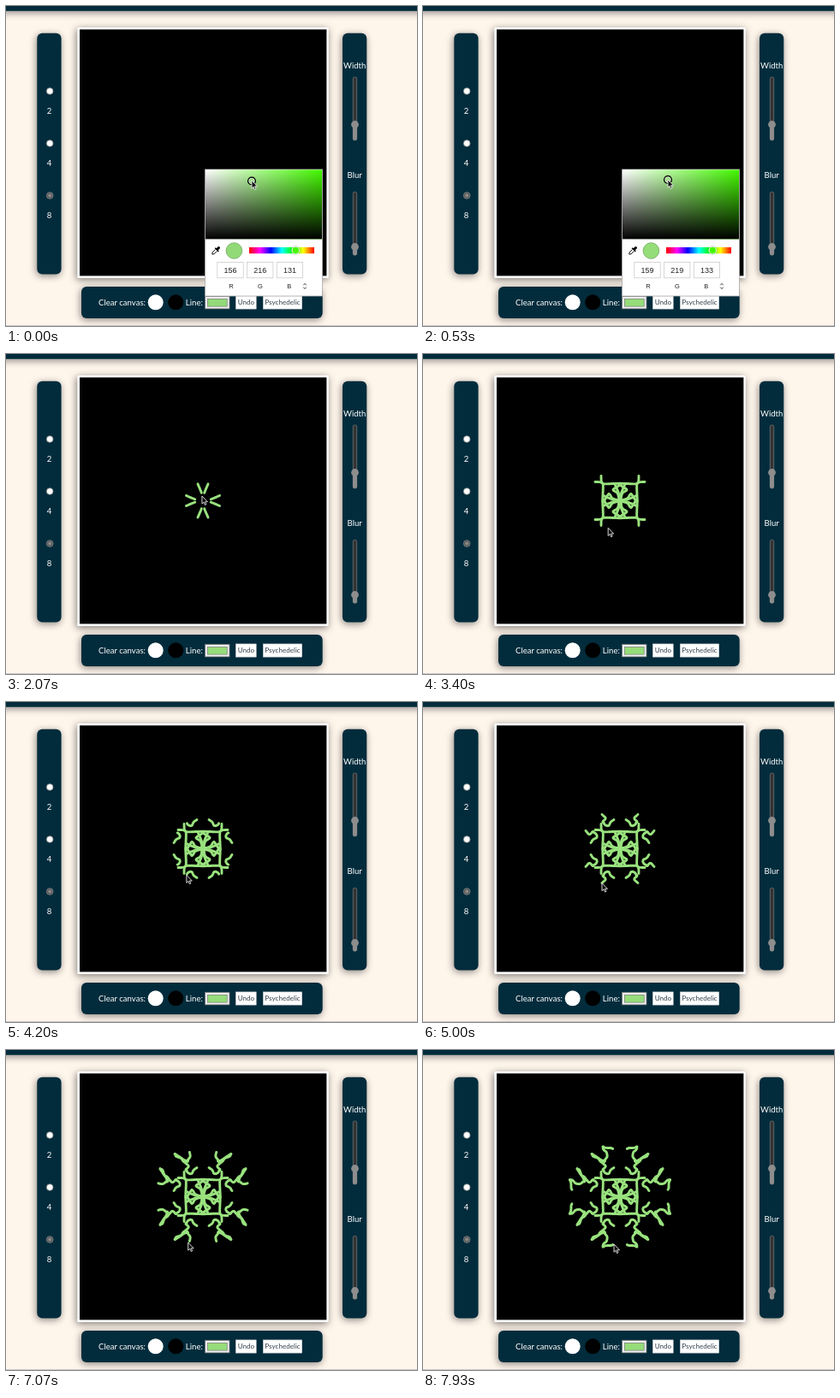
Recreate the animation shown at these times as an HTML page. Size 480 px wide and 374 px high, loop 8 s.

```html
<!DOCTYPE html>
<html lang="en">
<head>
<meta charset="utf-8">
<title>Kaleidoscope drawing</title>
<style>
html, body { margin: 0; width: 100%; height: 100%; overflow: hidden; background: #fef5eb; }
svg { display: block; width: 100%; height: 100%; }
text { font-family: Lato, "Open Sans", sans-serif; font-size: 9.6px; fill: #fff; }
.mid { text-anchor: middle; }
.panel { fill: #022c3c; filter: drop-shadow(-1px 2px 4px rgba(0,0,0,.45)); }
.btn { fill: #fff; stroke: #c9cdd0; stroke-width: .6; }
.btnText { font-size: 8.1px; fill: #33404c; text-anchor: middle; }
.num, .lab { font-family: "Liberation Sans", Arial, sans-serif; text-anchor: middle; fill: #222; }
.num { font-size: 9px; }
.lab { font-size: 7.5px; }
#art { fill: none; stroke: #99e27e; stroke-width: 2.9; stroke-linecap: round; stroke-linejoin: round; }
</style>
</head>
<body>
<svg viewBox="0 0 480 374" preserveAspectRatio="none">
  <defs>
    <linearGradient id="sat"><stop stop-color="#fff"/><stop offset="1" stop-color="#43f800"/></linearGradient>
    <linearGradient id="dark" x2="0" y2="1"><stop stop-color="#000" stop-opacity="0"/><stop offset="1"/></linearGradient>
    <linearGradient id="hue"></linearGradient>
    <path id="line"/>
  </defs>

  <rect width="480" height="374" fill="#fef5eb"/>
  <rect class="panel" x="-9" y="-9" width="498" height="14.8"/>
  <rect y="373" width="480" height="1" fill="#cbcaca"/>

  <rect class="panel" x="36.3" y="31.8" width="28.3" height="281.6" rx="6"/>
  <rect class="panel" x="393" y="31.8" width="28.3" height="281.6" rx="6"/>
  <rect class="panel" x="88" y="328" width="281.7" height="37" rx="6"/>
  <rect x="83.3" y="25" width="293.4" height="293" rx="1.5" fill="#fff" style="filter:drop-shadow(-1px 2px 4px rgba(0,0,0,.5))"/>
  <rect x="86" y="27.4" width="288.4" height="288"/>

  <g id="radios"></g>
  <text class="mid" x="407.2" y="73">Width</text>
  <text class="mid" x="407.2" y="201">Blur</text>
  <g id="sliders"></g>

  <text x="108" y="349.5">Clear canvas:</text>
  <circle cx="174.7" cy="346.3" r="9" fill="#fff"/>
  <circle cx="198.3" cy="346.3" r="9"/>
  <text x="209.8" y="349.5">Line:</text>
  <rect x="232.5" y="339.3" width="28.5" height="14.6" fill="#f0f0f0" stroke="#777" stroke-width=".8"/>
  <rect class="tint" x="235.4" y="342.3" width="22.8" height="8.8" stroke="#777" stroke-width=".7"/>
  <rect class="btn" x="268.4" y="338.9" width="23.8" height="15.2"/>
  <text class="btnText" x="280.4" y="349">Undo</text>
  <rect class="btn" x="300.3" y="338.9" width="45.4" height="15.2"/>
  <text class="btnText" x="323" y="349">Psychedelic</text>

  <g id="art"></g>

  <g id="picker">
    <rect x="232.5" y="191" width="137" height="148" fill="#fff" stroke="#aaa" stroke-width=".8"/>
    <rect x="233" y="191.4" width="136" height="81" fill="url(#sat)"/>
    <rect x="233" y="191.4" width="136" height="81" fill="url(#dark)"/>
    <g id="spot" fill="none"><circle r="4.3" stroke="#000" stroke-width="1.5"/><circle r="3.3" stroke="#fff" stroke-width=".6"/></g>
    <g transform="translate(244.8 286.2) rotate(45)">
      <path d="M-1.5 -6q1.5 -1.5 3 0v3.2h1.4v1.6h-5.8v-1.6h1.4z"/>
      <path d="M-1.3 -1v5l1.3 1.6l1.3 -1.6v-5" fill="#fff" stroke="#000" stroke-width=".9"/>
    </g>
    <circle class="tint" cx="266.4" cy="286" r="9.3" stroke="#71a65f" stroke-width=".8"/>
    <rect x="284" y="282" width="76" height="7.3" fill="url(#hue)"/>
    <circle cx="338.3" cy="285.6" r="4.3" fill="#43f800" stroke="#fff"/>
    <circle cx="338.3" cy="285.6" r="4.9" fill="none" stroke="#999" stroke-width=".4"/>
    <g id="fields"></g>
    <path d="M347.3 326.3l1.7 -2l1.7 2M347.3 328.6l1.7 2l1.7 -2" fill="none" stroke="#333" stroke-width=".9"/>
  </g>

  <g id="cursor">
    <path id="arrow" d="M0 0V9.2L2.1 7.3L3.5 10.5L5 9.8L3.6 6.8H6.5Z" fill="#111" stroke="#fff" stroke-width=".8"/>
    <path id="hand" d="M1.2 .6Q2.1 -.4 2.8 .7V3.7Q4 3 4.6 4Q5.7 3.4 6.1 4.3Q7.3 4 7.4 5.2V7.3L6.4 9.8H2.2L-.8 6.2Q-.5 5.2 1.2 6.2Z" fill="#fff" stroke="#333" stroke-width=".5"/>
  </g>
</svg>
<script>
const LOOP = 8000, STEP = 200 / 3, CX = 230, CY = 171.5, LAG = 80;
const CLICK = 1530;
const $ = id => document.getElementById(id);

for (let i = 0; i <= 6; i++)
  $('hue').innerHTML += `<stop offset="${i / 6}" stop-color="hsl(${360 - 60 * i} 100% 50%)"/>`;

$('radios').innerHTML = [2, 4, 8].map((n, i) => {
  const y = 99.5 + 61 * i, on = n === 8;
  return `<circle cx="51.2" cy="${y}" r="3.8" fill="${on ? '#555' : '#fff'}" stroke="#8b8b8b" stroke-width=".8"/>` +
    (on ? `<circle cx="51.2" cy="${y}" r="2" fill="#8b8b8b"/>` : '') +
    `<text class="mid" x="50.6" y="${y + 26.5}">${n}</text>`;
}).join('');

const slider = (y, thumb) =>
  `<rect x="405.3" y="${y}" width="4.4" height="74" rx="2" fill="#333" stroke="#727272" stroke-width=".8"/>
   <rect x="405" y="${thumb}" width="5" height="${y + 74 - thumb}" rx="2" fill="#8d8d8d"/>
   <circle cx="407.5" cy="${thumb}" r="4.4" fill="#8d8d8d"/>`;
$('sliders').innerHTML = slider(83, 138.5) + slider(217.3, 281.5);

$('fields').innerHTML = ['R', 'G', 'B'].map((c, i) => {
  const x = 262 + 34.7 * i;
  return `<rect x="${x - 15.2}" y="299.4" width="30.4" height="18.4" fill="#fff" stroke="#ccc" stroke-width=".8"/>
    <text class="num" x="${x}" y="311.6"></text>
    <text class="lab" x="${x + 1 - i * .8}" y="330">${c}</text>`;
}).join('');

// Eight mirrored copies of one line
let copies = '';
for (const sx of [1, -1]) for (const sy of [1, -1])
  for (const m of [[sx, 0, 0, sy], [0, sy, sx, 0]])
    copies += `<use href="#line" transform="matrix(${m} ${CX} ${CY})"/>`;
$('art').innerHTML = copies;

// Pointer moves through evenly timed points, measured from the middle of the drawing
const move = (from, to, pen, ...pts) => ({ from, to, pen, pts });
const moves = [
  move(0, 530, 0, [57, 32.5], [56, 31.5]),
  move(670, 1470, 0, [56, 31.5], [30, 3], [.5, -21.5], [-6, -19.5]),
  move(CLICK, 1800, 1, [-6, -19.5], [-6, -19.5]),
  move(1800, 3260, 1, [-6, -19.5], [-1.5, -8.5], [-1, 2], [-3, 9], [-8, 13], [1, 20], [-20, 20], [-22, 29]),
  move(3260, 3530, 0, [-22, 29], [-7, 34]),
  move(3530, 5000, 1, [-7, 34], [-14, 27], [-20, 31], [-17, 36], [-21, 40]),
  move(5000, 6270, 1, [-21, 40], [-33, 50], [-18, 41]),
  move(6270, 7930, 1, [-18, 41], [-15, 50], [-20, 58.5], [-7, 55.5])
];

function at(t) {
  const { from, to, pts } = moves.findLast(m => m.from <= t);
  const n = pts.length - 1;
  const s = Math.min((t - from) / (to - from), 1) * n;
  const i = Math.min(Math.floor(s), n - 1), u = s - i;
  const a = pts[i], b = pts[i + 1], before = pts[i - 1] || a, after = pts[i + 2] || b;
  // an unsteady hand in the outer arms
  const shake = from >= 3530 ? .8 * Math.sin(Math.PI * u) : 0;
  const wobble = [shake * Math.sin(t / 55), shake * Math.cos(t / 83)];
  return [0, 1].map(k => {
    const m0 = (b[k] - before[k]) * .35, m1 = (after[k] - a[k]) * .35;
    return a[k] + u * u * (3 - 2 * u) * (b[k] - a[k]) + u * (1 - u) * ((1 - u) * m0 - u * m1) + wobble[k];
  });
}

function lineTo(now) {
  let d = '';
  for (const { from, to, pen } of moves) {
    if (!pen || now < from) continue;
    const end = Math.max(from, Math.min(now - LAG, to - 1));
    const pts = [at(from)];
    for (let t = from; t < end; t += 30) pts.push(at(t));
    pts.push(at(end));
    d += 'M' + pts.map(p => p.map(v => v.toFixed(2)).join(' ')).join('L');
  }
  return d;
}

const show = (id, on) => $(id).style.display = on ? '' : 'none';
const nums = document.querySelectorAll('.num');
const tints = document.querySelectorAll('.tint');
let last = -1;

function draw(frame) {
  const t = frame * STEP + 4, open = t < CLICK;
  const [x, y] = at(t);
  const u = Math.min(t / 530, 1);
  const rgb = [156 + 3 * u, 216 + 3 * u, 131 + 2 * u].map(Math.round);
  const [r, g, b] = rgb;
  nums.forEach((n, i) => n.textContent = rgb[i]);
  tints.forEach(e => e.setAttribute('fill', `rgb(${r - 10},${g + 2},${b - 12})`));
  $('spot').setAttribute('transform', `translate(${287 - u} ${204.5 - 1.5 * u})`);
  const hand = open && y + CY < 191;
  show('picker', open);
  show('hand', hand);
  show('arrow', !hand);
  $('cursor').setAttribute('transform', `translate(${x + CX} ${y + CY})`);
  $('line').setAttribute('d', lineTo(t));
}

const start = performance.now();
function tick(now) {
  const t = Math.max(0, now - start) % LOOP;
  const frame = Math.floor((t + 4) / STEP) % 120;
  if (frame !== last) draw(last = frame);
  requestAnimationFrame(tick);
}
draw(0);
requestAnimationFrame(tick);
</script>
</body>
</html>
```
